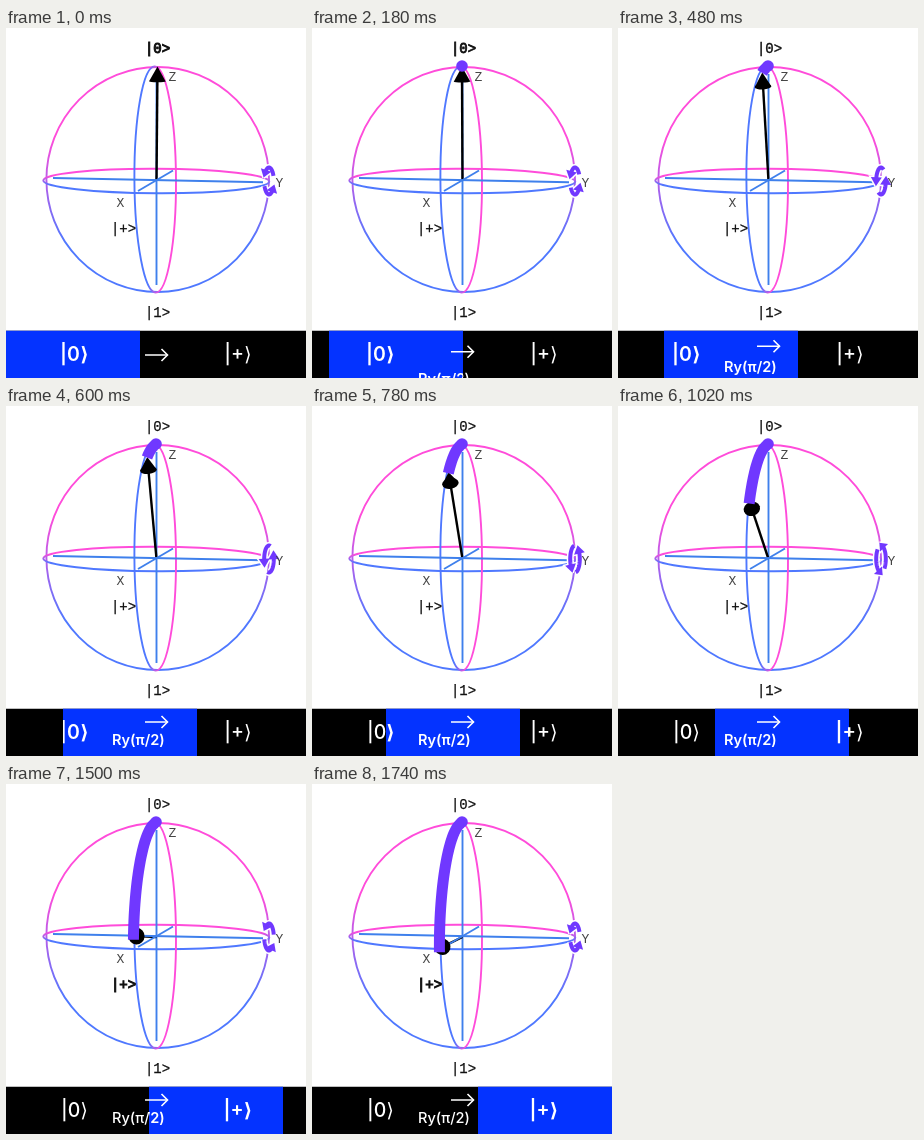
An HTML page with a canvas that plays this animation: 300x350 px, repeating every 3.54 s.

```html
<!DOCTYPE html>
<html lang="en">
<head>
<meta charset="utf-8">
<title>Qubit rotation on the Bloch sphere</title>
<style>
  html, body { margin: 0; width: 100%; height: 100%; overflow: hidden; background: #fff; }
  canvas { display: block; }
</style>
</head>
<body>
<canvas id="stage" width="300" height="350"></canvas>
<script>
const ctx = document.getElementById('stage').getContext('2d');
const LOOP = 3540, STEP = 60, LAST = 29;
const PINK = '#ff4cda', BLUE = '#4f78ff', AXIS = '#3f80ec', PURPLE = '#7038ff';
const BAR_TOP = 302.5;
const origin = [150.5, 153];
const rad = deg => deg * Math.PI / 180;
const clamp = v => Math.max(0, Math.min(1, v));

function line(points, color, width) {
  ctx.beginPath();
  points.forEach(p => ctx.lineTo(...p));
  ctx.strokeStyle = color;
  ctx.lineWidth = width;
  ctx.stroke();
}

function fillShape(points, color) {
  ctx.beginPath();
  points.forEach(p => ctx.lineTo(...p));
  ctx.closePath();
  ctx.fillStyle = color;
  ctx.fill();
}

function disc(x, y, r, color) {
  ctx.beginPath();
  ctx.arc(x, y, r, 0, 2 * Math.PI);
  ctx.fillStyle = color;
  ctx.fill();
}

// Outline whose colour blends from (x0,y0) to (x1,y1).
function ring(cx, cy, rx, ry, tilt, [x0, y0, x1, y1], from, to) {
  const blend = ctx.createLinearGradient(x0, y0, x1, y1);
  blend.addColorStop(0, from);
  blend.addColorStop(1, to);
  ctx.beginPath();
  ctx.ellipse(cx, cy, rx, ry, rad(tilt), 0, 2 * Math.PI);
  ctx.strokeStyle = blend;
  ctx.lineWidth = 1.9;
  ctx.stroke();
}

function label(text, x, y, size, color, boldness = 0) {
  ctx.font = `${size}px "Liberation Mono", monospace`;
  ctx.textAlign = 'center';
  ctx.fillStyle = ctx.strokeStyle = color;
  ctx.fillText(text, x, y);
  if (boldness > 0) {
    ctx.lineWidth = boldness;
    ctx.strokeText(text, x, y);
  }
}

const ket = (text, x, y, emphasis = 0) =>
  label(text, x, y, 14, '#111', 0.25 + 0.75 * emphasis);
const axisName = (text, x, y) => label(text, x, y, 13, '#444');

// Point on the vertical great circle, measured from the north pole towards X.
function meridian(deg) {
  const sin = Math.sin(rad(deg)), cos = Math.cos(rad(deg));
  return [149.5 + 2 * cos - 22 * sin, 151.5 - 113 * cos];
}

function drawSphere() {
  ring(151.7, 151.5, 111.3, 112.5, 0, [0, 110, 0, 215], PINK, BLUE);
  ring(150.3, 153, 113, 12.2, 0.3, [0, 148, 0, 157], PINK, BLUE);
  ring(149.2, 151.5, 20.8, 113, -0.3, [142, 0, 154, 0], BLUE, PINK);
  line([[150.5, 46], [150.5, 257]], AXIS, 1.9);
}

// The arrowhead is a cone, seen more and more from its tip.
function drawVector(turn) {
  const tip = meridian(96.5 * turn);
  const back = [origin[0] - tip[0], origin[1] - tip[1]];
  const length = Math.hypot(...back);
  const [ux, uy] = back.map(v => v / length);
  const base = [tip[0] + back[0] * 0.13, tip[1] + back[1] * 0.13];
  const radius = 8.3;
  const depth = radius * Math.sqrt(1 - Math.min(1, length / 115) ** 2);
  line([base, origin], '#000', 2.4);
  line([[47, 150], [257, 154.3]], AXIS, 1.9);
  line([[132, 163], [167, 142.5]], AXIS, 1.9);

  ctx.beginPath();
  ctx.ellipse(...base, depth, radius, Math.atan2(uy, ux), 0, 2 * Math.PI);
  ctx.fillStyle = '#000';
  ctx.fill();
  const side = s => [base[0] - uy * radius * s, base[1] + ux * radius * s];
  fillShape([tip, side(1), side(-1)], '#000');
}

function drawTrail(turn) {
  if (!turn) return;
  const points = [];
  for (let i = 0; i <= 40; i++) points.push(meridian(98.5 * turn * i / 40));
  disc(150, 38, 5.8, PURPLE);
  line(points, PURPLE, 11);
}

// Two arrows chasing each other around the Y axis.
function drawSpinner(turn) {
  const rx = 4.8, ry = 13.5;
  const at = deg => [263 - rx * Math.sin(rad(deg)), 153 - ry * Math.cos(rad(deg))];
  const arrows = [47, 227].map(phase => {
    const head = phase + 180 * turn;
    const arc = [];
    for (let a = head - 115; a <= head; a += 5) arc.push(at(a));
    const [x, y] = at(head);
    const dx = -rx * Math.cos(rad(head)), dy = ry * Math.sin(rad(head));
    const speed = Math.hypot(dx, dy), ux = dx / speed, uy = dy / speed;
    const reach = 3 + 4 * speed / ry;
    const tip = [x + ux * reach, y + uy * reach];
    const side = s => [x - ux * 2 - uy * 5.5 * s, y - uy * 2 + ux * 5.5 * s];
    return { arc, triangle: [tip, side(1), side(-1), tip] };
  });
  for (const { arc, triangle } of arrows) {
    line(arc, '#fff', 7);
    line(triangle, '#fff', 3);
  }
  for (const { arc, triangle } of arrows) {
    line(arc, PURPLE, 4);
    fillShape(triangle, PURPLE);
  }
}

function drawBarLayer(x, width, background, weight, rise) {
  const sans = size => `${weight} ${size}px Inter, "DejaVu Sans", sans-serif`;
  ctx.save();
  ctx.beginPath();
  ctx.rect(x, BAR_TOP, width, 350 - BAR_TOP);
  ctx.clip();
  ctx.fillStyle = background;
  ctx.fillRect(x, BAR_TOP, width, 350 - BAR_TOP);
  ctx.fillStyle = '#fff';
  ctx.font = sans(19.5);
  ctx.textAlign = 'center';
  ctx.fillText('|0⟩', 68.5, 333);
  ctx.fillText('|+⟩', 232, 333);
  ctx.font = sans(14.6);
  ctx.textAlign = 'left';
  ctx.fillText('Ry(π/2)', 106, 338.5 + 25 * rise);
  const y = 316 + 11 * rise;
  line([[139, y], [161.5, y]], '#fff', 1.6);
  line([[155.5, y - 6], [161.5, y], [155.5, y + 6]], '#fff', 1.6);
  ctx.restore();
}

function draw(elapsed) {
  const k = Math.min(LAST, Math.floor(elapsed % LOOP / STEP));
  const t = k / LAST;
  const turn = 0.8 * (1 - Math.cos(Math.PI * t)) / 2 + 0.2 * t;
  const intro = clamp(1 - k / 10);

  ctx.fillStyle = '#fff';
  ctx.fillRect(0, 0, 300, 350);
  drawSphere();
  drawVector(turn);
  drawTrail(turn);
  drawSpinner(turn);

  ket('|0>', 151.5, 24.5, intro);
  ket('|1>', 151.5, 289);
  ket('|+>', 117.5, 205, clamp((k - 17) / 8));
  axisName('Z', 166.5, 53);
  axisName('X', 114.5, 179);
  axisName('Y', 273.5, 158.5);

  drawBarLayer(0, 300, '#000', 500, intro);
  drawBarLayer(Math.round(166 * t), 134, '#0433ff', 600, intro);
}

let start;
function tick(now) {
  start ??= now;
  draw(now - start);
  requestAnimationFrame(tick);
}
requestAnimationFrame(tick);
</script>
</body>
</html>
```
